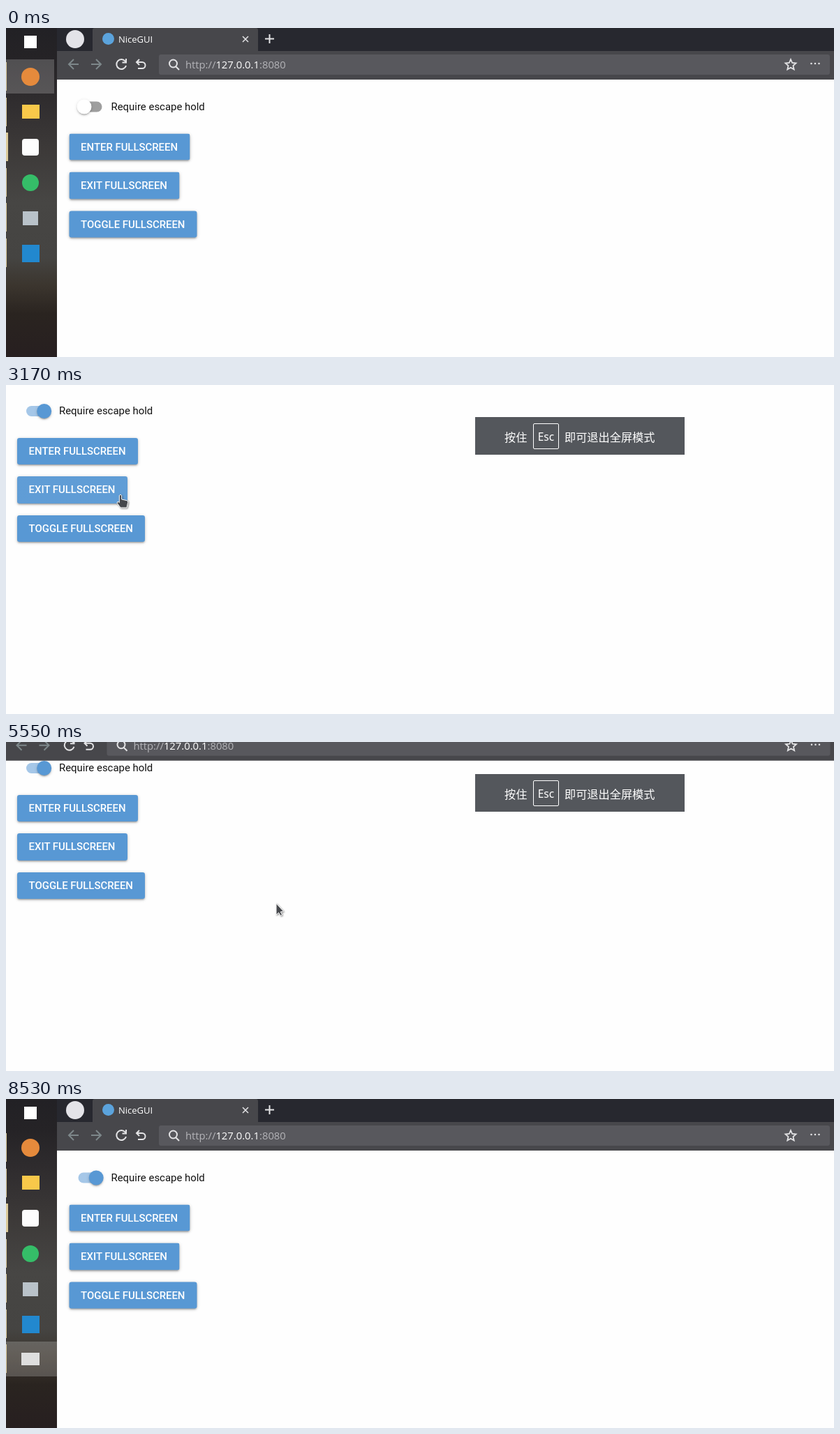
Recreate the animation shown at these times as an HTML page. Size 1186 px wide and 472 px high, loop 8650 ms.

```html
<!DOCTYPE html>
<html lang="en">
<head>
<meta charset="utf-8">
<title>Fullscreen control</title>
<style>
html, body { margin: 0; width: 100%; height: 100%; overflow: hidden; background: #fefefe; }
div, span, svg { position: absolute; box-sizing: border-box; white-space: nowrap; }
svg { overflow: visible; left: 0; top: 0; fill: none; stroke: #e4e4e6; stroke-width: 2; }
#stage { inset: 0; overflow: hidden; }

#bar { left: 0; top: 0; width: 73px; height: 472px; overflow: hidden;
  background: linear-gradient(#222125, #252326 44px, #2f2c2e 100px, #3c3938 170px, #474644 250px, #454442 330px, #3b352e 370px, #2a2420 410px, #271f20); }
.lit { background: #fff; opacity: .2; left: 0; }
.mark { left: 0; background: #dccb9c; }

.win { left: 0; top: 0; }
.page { left: 0; top: 0; font: 14.93px Roboto, sans-serif; color: #111; }
.btn { left: 15.5px; height: 38.4px; padding: 0 17.07px; line-height: 38.4px; font-weight: 500; color: #fff;
  background: #5898d4; border-radius: 3.2px; }
.track { left: 28.5px; top: 29.6px; width: 34.5px; height: 15px; border-radius: 8px; }
.knob { left: 26.8px; top: 26.6px; width: 21.4px; height: 21.4px; border-radius: 50%;
  box-shadow: 0 3px 1px -2px #0003, 0 2px 2px #00000024, 0 1px 5px #0000001f; }

.head { left: 0; top: 0; height: 73.5px; font: 14.8px "Open Sans", sans-serif; line-height: 20px; color: #b4b4b8; }
.strip { left: 0; top: -2px; width: 1400px; height: 35px; background: #27282f; }
.tools { left: 0; top: 33px; width: 1400px; height: 40.5px; background: #47474b; }
.tab { left: 51px; top: 0; width: 237px; height: 34px; background: #47474b; border-radius: 3px 3px 0 0; }
.field { top: 38px; height: 28.5px; border-radius: 3px; background: #58585d; }
.dot { border-radius: 50%; }

#toast { left: 672px; top: 46px; width: 300px; height: 54px; background: #54575c; color: #fff;
  font: 16.2px/20px "Noto Sans CJK SC", "Noto Sans CJK", sans-serif; }
#key { left: 83px; top: 9px; width: 37px; height: 37px; border: 1px solid #fff; border-radius: 2px;
  font: 500 15.5px/36px "Noto Sans", sans-serif; text-align: center; }
#ghost { left: 0; top: 0; width: 6px; height: 472px; overflow: hidden; }
#cursor svg { fill: #46484c; stroke: #fff; stroke-width: 1; filter: drop-shadow(1px 1px 1px #0007); }
</style>
</head>
<body>
<div id="stage">
  <div id="bar"></div>
  <div id="ghost"></div>
  <div class="win">
    <div class="page">
      <div class="track"></div>
      <div class="knob"></div>
      <span style="left:76px;top:27px;line-height:20px">Require escape hold</span>
      <div class="btn" style="top:75.7px">ENTER FULLSCREEN</div>
      <div class="btn" style="top:131.3px">EXIT FULLSCREEN</div>
      <div class="btn" style="top:187px">TOGGLE FULLSCREEN</div>
    </div>
    <div class="head">
      <div class="strip"></div>
      <div class="tools"></div>
      <div class="tab"></div>
      <div class="dot" style="left:13px;top:2.5px;width:26px;height:26px;background:#e3e3e8"></div>
      <div class="dot" style="left:64.5px;top:7px;width:17px;height:17px;background:#5ba3dc"></div>
      <span style="left:88px;top:5.5px;font-size:13px;color:#fff">NiceGUI</span>
      <div class="field" style="left:146px;right:0"></div>
      <span style="left:184px;top:41.5px">http://<b style="font-weight:400;color:#fff">127.0.0.1</b>:8080</span>
      <div class="field" style="left:calc(100% + 9px);width:200px"></div>
      <span style="left:calc(100% + 43px);top:49.5px;margin-top:-8px;font:16px/20px 'Noto Sans CJK SC','Noto Sans CJK',sans-serif;color:#97979c">点此搜索</span>
      <svg width="1" height="1">
        <path stroke="#7d878a" d="M31 52H17M24 45l-7 7 7 7M49 52h14M56 45l7 7-7 7"/>
        <path d="M98 48A7 7 0 1 0 99 54M99 44v5.5h-5.5M118 45l-4 4 4 4M114 49h8a4.5 4.5 0 0 1 0 9h-6"/>
        <path d="M161 51a5.5 5.5 0 1 0 11 0a5.5 5.5 0 1 0-11 0M170.500 55.500l4.500 4.500"/>
        <path stroke-width="1.500" d="M266 12l8 8M274 12l-8 8"/>
        <path d="M304.500 9v13M298 15.500h13"/>
      </svg>
      <svg width="1" height="1" style="left:100%">
        <path stroke-width="1.800" d="M-56 45l2.200 5 5.300.500-4 3.600 1.200 5.400-4.700-2.800-4.700 2.800 1.200-5.400-4-3.600 5.300-.500z"/>
        <path stroke-width="2.600" stroke-linecap="round" d="M-26.500 51h.01M-21 51h.01M-15.500 51h.01"/>
        <path stroke-width="1.600" d="M20 51a5.500 5.500 0 1 0 11 0a5.500 5.500 0 1 0-11 0M29.500 55.500l4.500 4.500"/>
      </svg>
    </div>
  </div>
  <div id="toast">
    <span style="left:42px;top:18px">按住</span>
    <div id="key">Esc</div>
    <span style="left:128px;top:18px">即可退出全屏模式</span>
  </div>
  <div id="cursor">
    <svg width="1" height="1"><path d="M0 0V16.500L3.600 13.300 6.200 17.800 8.600 16.600 6.300 12.200 10.500 11.500z"/></svg>
    <svg width="1" height="1"><path d="M-1.700 1.500Q0-1 1.700 1.500V7L9 8.700Q11 9.300 10.600 11.500L9 19H0L-4.800 12.500Q-5.200 10-2.900 10.600L-1.700 11.700z"/></svg>
  </div>
</div>
<script>
const LOOP = 8650, FADE = 200;
const $ = s => document.querySelector(s);
const clamp = v => Math.max(0, Math.min(1, v));
const within = (t, spans) => spans.some(([a, b]) => t >= a && t < b);
const move = (el, x, y) => el.style.transform = `translate(${x}px,${y}px)`;
const show = (el, on) => el.style.visibility = on ? 'visible' : 'hidden';

const bar = $('#bar'), ghost = $('#ghost'), win = $('.win'), page = $('.page'), head = $('.head');
const track = $('.track'), knob = $('.knob'), toast = $('#toast'), cursor = $('#cursor');
const [enter, exit] = document.querySelectorAll('.btn');
const [arrow, hand] = cursor.children;

// Taskbar
function block(cls, x, y, w, h, css = '') {
  const el = document.createElement('div');
  el.className = cls;
  el.style.cssText = `left:${x}px;top:${y}px;width:${w}px;height:${h}px;${css}`;
  bar.append(el);
  return el;
}
const browserLit = block('lit', 0, 45, 69, 49);
const recorderLit = block('lit', 0, 348, 73, 50);
const icons = [
  [19.5, 18, 18, '#fff', 0], [69.5, 26, 26, '#e58a3c', '50%'], [120, 25, 20, '#f8c84a', 0],
  [170.500, 24, 24, '#fdfdfd', '4px'], [222, 24, 24, '#35bd68', '50%'], [272.5, 22, 20, '#b9c2c9', 0],
  [323, 25, 25, '#2288cf', 0], [373, 26, 18, '#dedede', 0]
].map(([y, w, h, color, r]) => block('', 35 - w / 2, y - h / 2, w, h, `background:${color};border-radius:${r}`));
const marks = [49, 100, 150, 201, 251, 302, 352].map((y, i) => block('mark', 0, y, i == 2 ? 2.5 : 1.3, 41));
const recorder = [icons[7], marks[6]];

// Times when the pointer rests on, or presses, each button
const hovers = new Map([
  [enter, [[1560, 2080], [3960, 4690]]],
  [exit, [[2080, 2680], [3110, 3560], [3700, 3960]]]
]);
const presses = new Map([[enter, [[1900, 2080], [4630, 4710]]], [exit, [[3400, 3560]]]]);
const overSwitch = [[920, 1500]];
const between = [[2040, 2080], [4670, 4710]];
const full = [[2080, 3560], [4710, 6980]];

// time, x, y
const path = [
  [160, 712, 476], [1000, 116, 111], [1120, 118, 113], [1340, 118, 113], [1720, 137, 161], [2160, 137, 161],
  [2480, 150, 170], [2600, 150, 170], [2760, 244, 204], [2930, 244, 204], [3170, 164, 157], [3600, 164, 157],
  [3810, 200, 224], [4130, 195, 170], [4300, 195, 170], [4340, 193, 168], [4750, 193, 168],
  [5110, 387, 231.5], [5600, 387, 231.5], [5750, 389.5, 231.5], [7350, 389.5, 231.5], [7910, 738, 476]
];
function pointer(t) {
  const i = path.findIndex(p => p[0] > t);
  if (i < 1) return [738, 490];
  const [t0, x0, y0] = path[i - 1], [t1, x1, y1] = path[i];
  let k = (t - t0) / (t1 - t0);
  k = k * k * (3 - 2 * k);
  return [x0 + (x1 - x0) * k, y0 + (y1 - y0) * k];
}

function paintButton(el, t) {
  const glow = Math.max(0, ...hovers.get(el).map(([a, b]) =>
    clamp(Math.min((t - a) / FADE, (b + FADE - t) / FADE)))) * .15;
  el.style.backgroundImage = `linear-gradient(rgba(255,255,255,${glow}) 0 100%)`;
  el.style.boxShadow = within(t, presses.get(el))
    ? '0 3px 5px -1px #0003, 0 5px 8px #00000024, 0 1px 14px #0000001f' : '';
}

function toastAlpha(t) {
  if (t < 3560) return clamp((t - 2120) / 360);
  if (t < 6490) return clamp((t - 4750) / 360);
  return clamp((6770 - t) / 400);
}

function draw(t) {
  const isFull = within(t, full), isMid = within(t, between);
  show(bar, !isFull && !isMid);
  show(ghost, isMid);
  move(win, isMid ? -67 : 0, isMid ? 8 : 0);
  move(page, isFull ? 0 : 74.5, isFull ? 0 : 75.5);
  head.style.width = (isFull ? 1181.5 : 1107) + 'px';
  move(head, isFull ? -1.5 : 73, isFull ? -76 + 76 * clamp((t - 5430) / 320) : 0);

  const on = clamp((t - 1280) / 220);
  move(knob, 17.2 * on, 0);
  knob.style.background = `color-mix(in srgb, #5898d4 ${on * 100}%, #fff)`;
  track.style.background = on > .5 ? '#a5c7e8' : '#9e9e9e';
  paintButton(enter, t);
  paintButton(exit, t);

  const busy = t >= 8530;
  show(browserLit, !busy && bar.style.visibility == 'visible');
  show(recorderLit, busy);
  recorder.forEach(el => el.style.display = t < 320 ? 'none' : '');

  toast.style.opacity = isFull ? toastAlpha(t) : 0;
  move(cursor, ...pointer(t));
  const pointing = within(t, [...overSwitch, ...hovers.get(enter), ...hovers.get(exit)]);
  show(arrow, !pointing);
  show(hand, pointing);
}

const shade = document.createElement('style');
shade.textContent = '.btn{box-shadow:0 1px 5px #0003,0 2px 2px #00000024,0 3px 1px -2px #0000001f}';
document.head.append(shade);

// Trailing copy of the window, seen at the left edge while it slides
draw(1000);
const copy = win.cloneNode(true);
move(copy, -141.5, 8);
ghost.append(copy);

const start = performance.now();
function tick(now) {
  draw(Math.max(0, now - start) % LOOP);
  requestAnimationFrame(tick);
}
requestAnimationFrame(tick);
</script>
</body>
</html>
```
